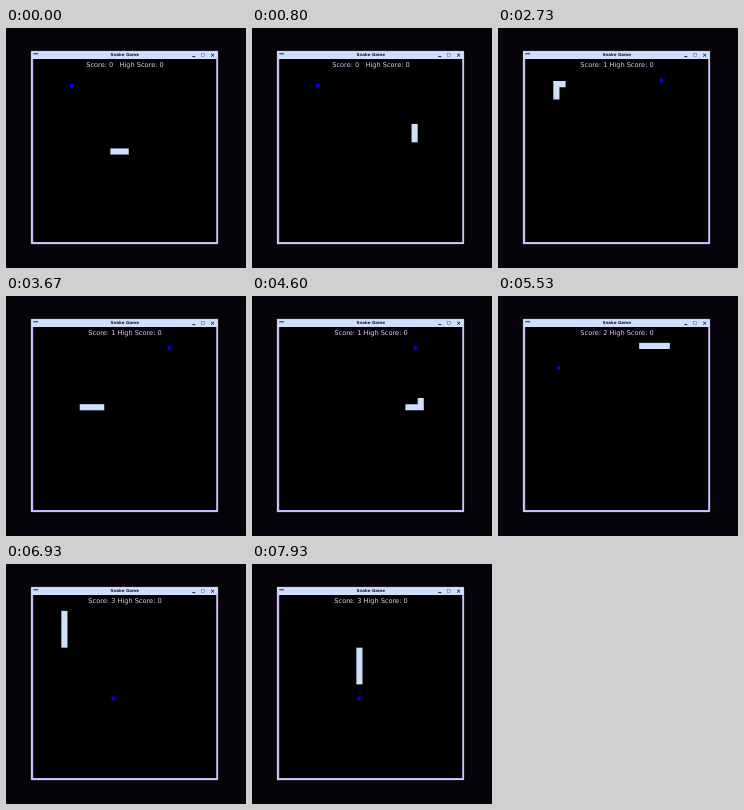
Animation of 240x240 px, one loop 8000 ms. Source, as an HTML page:

```html
<!DOCTYPE html>
<html lang="en">
<head>
<meta charset="utf-8">
<title>Snake Game</title>
<style>
  html, body { margin: 0; width: 100%; height: 100%; overflow: hidden; background: #07030b; }
  svg { display: block; width: 100vw; height: 100vh; }
  text { font-family: "DejaVu Sans", sans-serif; text-anchor: middle; white-space: pre; }
</style>
</head>
<body>
<svg viewBox="0 0 240 240">
  <rect width="240" height="240" fill="#07030b"/>
  <rect x="25" y="23" width="187" height="193" fill="#c8b8f4"/>
  <path d="M25.3 216V23.3H211.7V215.7H25" fill="none" stroke="#d4d4f8" stroke-width=".6"/>
  <rect x="25.5" y="23.5" width="186" height="7.5" fill="#cfdefa"/>
  <rect x="27.2" y="31" width="183" height="183" fill="#000"/>

  <text x="118.8" y="28.4" font-size="4.1" font-weight="bold" fill="#181830">Snake Game</text>
  <g fill="none" stroke="#202030" stroke-width="1">
    <path d="M27.3 25.8h4.7"/>
    <path d="M186.3 28.6h3"/>
    <rect x="195.4" y="25.4" width="3.2" height="3.2" stroke-width=".6" stroke="#787888"/>
    <path d="M205.2 25.8l2.8 2.8m0-2.8l-2.8 2.8"/>
  </g>

  <text id="score" x="119" y="39.2" font-size="6.6" fill="#e8c8f4"></text>
  <circle id="food" r="1.9" fill="#0000f8"/>
  <polyline id="snake" fill="none" stroke="#cfe0fb" stroke-width="6.13" stroke-linecap="square" stroke-linejoin="miter"/>
</svg>
<script>
const LOOP = 8000, FPS = 15, CELL = 6.13, CX = 119.7, CY = 123.5;
const STEPS_PER_FRAME = 0.914, STEP_OFFSET = 0.3;
const DIRS = { R: [1, 0], L: [-1, 0], U: [0, -1], D: [0, 1] };
const ROUTE = "R7 U11 L17 D9 R18 U10 L18 D6 R8 D5";
const FOODS = [[65.5, 57.5], [163.5, 52], [60.5, 72], [107, 134.5]];
const START_LENGTH = 3;
const REACH = 0.75 * CELL;

const $ = id => document.getElementById(id);
const score = $("score"), food = $("food"), snake = $("snake");
const toStage = ([i, j]) => [CX + i * CELL, CY + j * CELL];

// Head positions, beginning with the tail of the resting snake
const cells = [[-2, 0], [-1, 0], [0, 0]];
for (const leg of ROUTE.split(" ")) {
  const [dx, dy] = DIRS[leg[0]];
  for (let n = +leg.slice(1); n > 0; n--) {
    const [x, y] = cells[cells.length - 1];
    cells.push([x + dx, y + dy]);
  }
}
const path = cells.map(toStage);
const lastStep = path.length - START_LENGTH;

// Steps at which the head reaches each piece of food
const meals = [];
for (let s = 0; s <= lastStep; s++) {
  const [x, y] = path[s + START_LENGTH - 1];
  const [fx, fy] = FOODS[meals.length];
  if (Math.hypot(x - fx, y - fy) < REACH) meals.push(s);
}

function draw(t) {
  const frame = Math.floor((t + 4) * FPS / 1000);
  const step = Math.min(lastStep, Math.floor(frame * STEPS_PER_FRAME + STEP_OFFSET));
  const points = meals.filter(m => m <= step).length;
  // A new segment shows one step after the meal
  const grown = meals.filter(m => m < step).length;
  const end = step + START_LENGTH;
  const body = path.slice(end - START_LENGTH - grown, end);

  snake.setAttribute("points", body.map(p => p.map(v => v.toFixed(2)).join()).join(" "));
  food.setAttribute("cx", FOODS[points][0]);
  food.setAttribute("cy", FOODS[points][1]);
  score.textContent = `Score: ${points}${points ? " " : "   "}High Score: 0`;
}

const start = performance.now();
function tick() {
  draw((performance.now() - start) % LOOP);
  requestAnimationFrame(tick);
}
tick();
</script>
</body>
</html>
```
